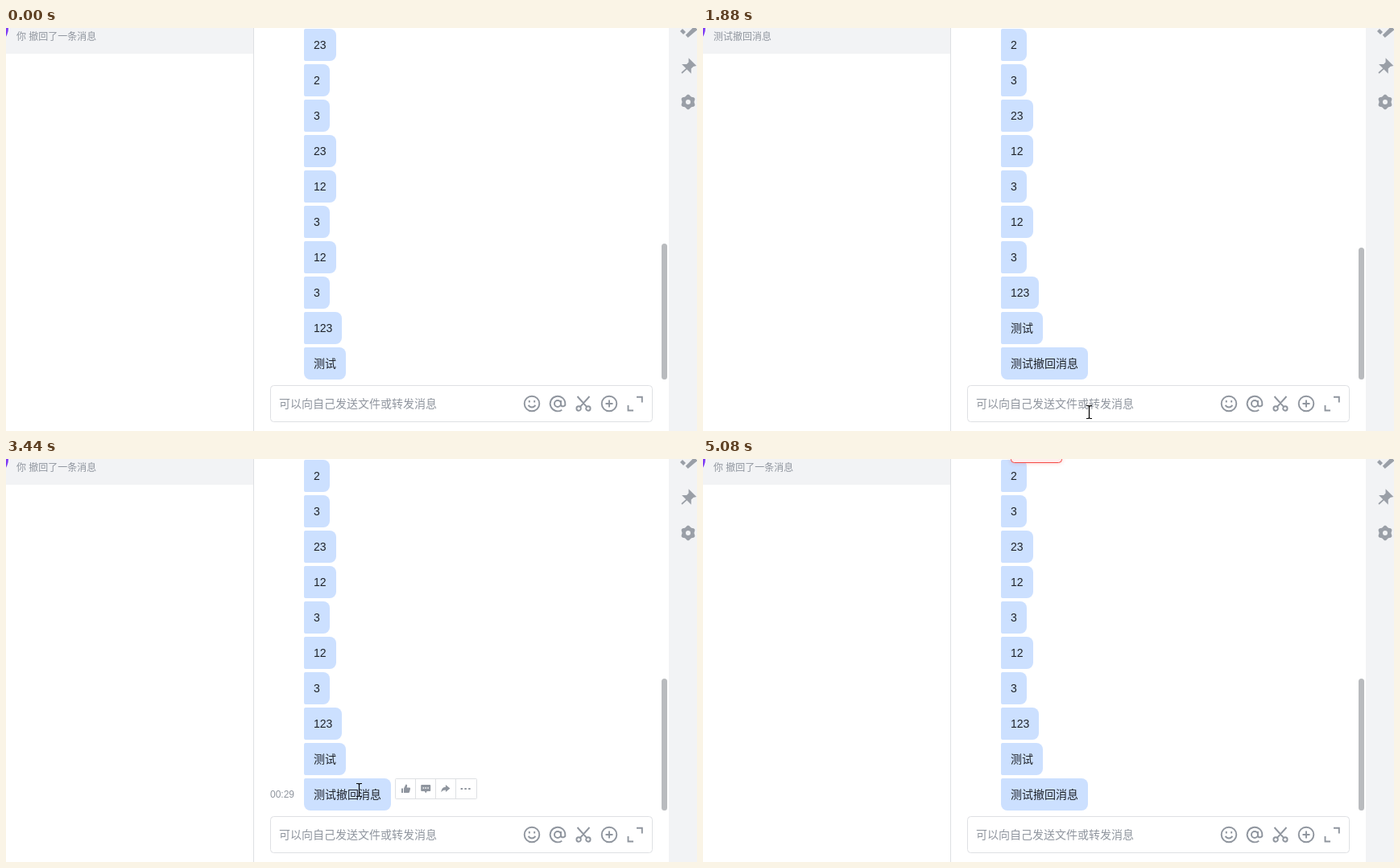
An HTML page with a canvas that plays this animation: 858x501 px, repeating every 5250 ms.

```html
<!DOCTYPE html>
<html lang="zh-CN">
<head>
<meta charset="utf-8">
<style>
html, body { margin: 0; height: 100%; overflow: hidden; background: #fff; }
canvas { display: block; }
</style>
</head>
<body>
<canvas id="stage" width="858" height="501"></canvas>
<script>
const LOOP = 5250;
const SENT = 1660, RECALLED = 3040, TOAST = 4640;
const MENU_TIMES = [[2380, 2960], [3740, 4360]];
const INK = '#1f2329', GREY = '#8f959e', DARK = '#646a73', LINE = '#dee0e3', PANEL = '#f2f3f5';
const FONT = '"Liberation Sans", "Noto Sans CJK SC", "Noto Sans CJK", sans-serif';
const IME_FONT = '"Noto Sans", "Noto Sans CJK SC", "Noto Sans CJK", sans-serif';
const MESSAGES = ['23', '2', '3', '23', '12', '3', '12', '3', '123', '测试', '测试撤回消息'];

const FIRST_WORD = ['c', 'ce', "ce's", "ce'sh", "ce'shi"];
const SECOND_WORD = ['c', 'ch', 'che', "che'h", "che'hu", "che'hui", "che'hui'x", "che'hui'xi",
  "che'hui'xia", "che'hui'xiao", "che'hui'xiao'x", "che'hui'xiao'xi"];
// The longest matching prefix supplies the suggestions.
const CANDIDATES = [
  ["che'hui'x", '撤回消息 撤回 扯会 车 撤 扯 彻'],
  ["che'h", '撤回 扯会 车 撤 扯 彻 澈'],
  ['che', '车 撤 扯 彻 澈 掣 坼'],
  ['ch', '出 吃 车 长 成 场 处'],
  ["ce's", '测试 侧室 测 侧 策 册 厕'],
  ['ce', '测 侧 策 册 厕 恻 岑'],
  ['c', '才 从 次 此 出 草 测'],
];

// Pointer path: time, x, y.
const PATH = [
  [80, 431, 473], [1640, 431, 473], [1880, 479, 477], [2060, 486, 440], [2300, 571, 411],
  [2480, 600, 385], [2640, 634, 370], [2840, 646, 366], [2960, 646, 366], [3140, 540, 400],
  [3290, 310, 400], [3360, 360, 376], [3440, 437, 411], [3640, 568, 411], [3740, 573, 411],
  [4000, 613, 393], [4200, 622, 367], [4360, 622, 367], [4600, 500, 420], [4740, 474, 446],
  [4880, 518, 468], [5070, 505, 515],
];

const ICON = {
  star: 'M0-6l1.8 3.9 4.2.5-3.1 2.9.8 4.2L0 3.5l-3.7 2 .8-4.2L-6-1.6l4.2-.5z',
  pin: 'M1-6l5 5-2 .5-2 2v3l-6-6h3l2-2zM-1 1.5l-4.5 4',
  task: 'M-6 0l2-1.5 2.5 2L4-5l2 1.5-7.5 8z',
  undo: 'M-2.5-5l-3 3 3 3M-5.5-2h7a3.5 3.5 0 0 1 0 7h-4',
  translate: 'M-5.2-2.5a5.7 5.7 0 0 1 10.8 2M5.2 2.5A5.7 5.7 0 0 1-5.6 .5M-2 2.5L0-2.5l2 5M-1.3 1h2.6',
  select: 'M0-4h6M0 0h6M0 4h6M-6-4l1 1 2-2M-6 0l1 1 2-2M-6 4l1 1 2-2',
  trash: 'M-6-4h12M-2-6h4M-4.5-4v9.5h9v-9.5M-1.5-1v4M1.5-1v4',
  dots: 'M-6-1h2.4v2h-2.4zM-1.2-1h2.4v2h-2.4zM3.6-1h2.4v2h-2.4z',
  thumb: 'M-5.5-.5h2V5h-2zM-2.5-.5L0-5.5c1.8 0 2 1.5 1.2 4h3.3c1 0 1.2.8 1 1.6l-1 4c-.2.6-.6.9-1.2.9h-5.8z',
  comment: 'M-5-5H5q1 0 1 1v6q0 1-1 1H1.5L0 5.5-1.5 3H-5q-1 0-1-1v-6q0-1 1-1zM-3.6-1.8v1.6h1.6v-1.6zM-.8-1.8v1.6h1.6v-1.6zM2-1.8v1.6h1.6v-1.6z',
  share: 'M0-5l5.5 4.5L0 4V1.4c-2.5 0-4 .6-5.5 2.8.2-4 2-6.3 5.5-6.5z',
  smile: 'M9.3 0a9.3 9.3 0 1 0-18.6 0a9.3 9.3 0 1 0 18.6 0M-4.5 2q4.5 5 9 0M-3.2-4v2.4M3.2-4v2.4',
  at: 'M4 0a4 4 0 1 0-8 0a4 4 0 1 0 8 0M4-4v5.2a2.7 2.7 0 0 0 5.3-1.2a9.3 9.3 0 1 0-4 7.7',
  scissors: 'M-7.5-9L4.2 4.2M7.5-9L-4.2 4.2M-3.2 6a2.7 2.7 0 1 0-5.4 0a2.7 2.7 0 1 0 5.4 0M8.6 6a2.7 2.7 0 1 0-5.4 0a2.7 2.7 0 1 0 5.4 0',
  plus: 'M9.3 0a9.3 9.3 0 1 0-18.6 0a9.3 9.3 0 1 0 18.6 0M-4.5 0h9M0-4.5v9',
  expand: 'M-8.5 2v6.5H-2M2-8.3h6.8v6.8',
  pen: 'M-10 0l3-3 4 4-3 3zM-3.2 4.8L7.5-6l4 4L-.2 8z',
  hand: 'M0 0c-1 0-1.5.7-1.5 1.6v8.2L-3 8.4c-1.2-1-3 .2-2 1.6l4 6v1.8h8.6V16l1.5-3.6V7c0-1.6-2-1.7-2.3-.4 0-1.7-2.4-2-2.7-.5-.1-1.5-2.4-1.6-2.7-.2V1.5C1.4.6 1 0 0 0zM1.5 6v4M4.1 6.5V10M6.8 7v3',
  arrow: 'M0 0v15l3.5-3.3 2.4 5.3 2.2-1-2.4-5.2h4.8z',
  beam: 'M-3.5-8h2.5l1 1 1-1h2.5M0-7V7M-3.5 8h2.5l1-1 1 1h2.5',
};
const MENU = [['star', '收藏'], ['pin', 'Pin'], ['task', '任务'], ['undo', '撤回'],
  ['translate', '翻译'], ['select', '多选'], ['trash', '删除'], ['dots', '更多']];

const ctx = document.getElementById('stage').getContext('2d');

function text(s, x, y, size = 14, color = INK, font = FONT) {
  ctx.font = `${size}px ${font}`;
  ctx.fillStyle = color;
  ctx.fillText(s, x, y);
}

function rect(x, y, w, h, fill, radius = 0, stroke) {
  ctx.beginPath();
  ctx.roundRect(x, y, w, h, radius);
  if (fill) { ctx.fillStyle = fill; ctx.fill(); }
  if (stroke) { ctx.strokeStyle = stroke; ctx.lineWidth = 1; ctx.stroke(); }
}

function withShadow(color, blur, paint) {
  ctx.save();
  ctx.shadowColor = color;
  ctx.shadowBlur = blur;
  paint();
  ctx.restore();
}

function icon(name, x, y, { fill, stroke, width = 1.2, scale = 1 }) {
  const path = new Path2D(ICON[name]);
  ctx.save();
  ctx.translate(x, y);
  ctx.scale(scale, scale);
  ctx.lineWidth = width;
  if (fill) { ctx.fillStyle = fill; ctx.fill(path, 'evenodd'); }
  if (stroke) { ctx.strokeStyle = stroke; ctx.stroke(path); }
  ctx.restore();
}

function gear(x, y, color) {
  ctx.beginPath();
  for (let i = 0; i < 72; i++) {
    const a = i * Math.PI / 36, r = 8.4 + 0.9 * Math.cos(6 * a);
    ctx.lineTo(x + r * Math.sin(a), y - r * Math.cos(a));
  }
  ctx.closePath();
  ctx.moveTo(x + 3, y);
  ctx.arc(x, y, 3, 0, 7);
  ctx.fillStyle = color;
  ctx.fill('evenodd');
}

function pointerAt(t) {
  if (t < PATH[0][0]) return null;
  const i = PATH.findIndex(p => p[0] > t);
  if (i < 0) return null;
  const [t0, x0, y0] = PATH[i - 1], [t1, x1, y1] = PATH[i];
  const k = (t - t0) / (t1 - t0);
  return { x: x0 + (x1 - x0) * k, y: y0 + (y1 - y0) * k };
}

function draftAt(t) {
  if (t < 80 || t >= SENT) return { done: '', pre: '' };
  if (t < 660) return { done: '', pre: FIRST_WORD[Math.min(4, Math.floor((t - 80) / 90))] };
  if (t < 900) return { done: '测试', pre: '' };
  if (t >= 1520) return { done: '测试撤回消息', pre: '' };
  const key = t < 1120 ? Math.min(5, (t - 900) / 28) : Math.min(11, 6 + (t - 1120) / 44);
  return { done: '测试', pre: SECOND_WORD[Math.floor(key)] };
}

function drawFrame(t) {
  rect(0, 0, 307, 32, PANEL);
  rect(307, 0, 1, 501, LINE);
  ctx.beginPath();
  ctx.arc(-17, 0, 20, 0, 7);
  ctx.fillStyle = '#7f3bf5';
  ctx.fill();
  const unsent = t < SENT || t >= RECALLED;
  text(unsent ? '你 撤回了一条消息' : '测试撤回消息', 13, 15, 12, GREY);

  rect(823, 0, 35, 501, PANEL);
  const sideGrey = '#9a9fa7';
  icon('pen', 847, 4, { fill: sideGrey });
  icon('pin', 847, 48, { fill: sideGrey, stroke: sideGrey, scale: 1.45 });
  gear(847, 92, sideGrey);
  const top = t < SENT ? 268 : 273;
  rect(814, top, 7, 437 - top, '#b9bbbe', 3.5);
}

function drawMessages(t) {
  const first = t < SENT ? 0 : 1;
  return MESSAGES.slice(first, first + 10).map((message, i) => {
    const y = 1 + 44 * i;
    ctx.font = `14px ${FONT}`;
    const w = Math.round(ctx.measureText(message).width) + 24;
    rect(370, y, w, 40, '#cce0ff', [2, 8, 8, i === 9 ? 8 : 2]);
    text(message, 382, y + 25);
    return { y, right: 370 + w };
  });
}

function drawInput(draft) {
  rect(328.5, 444.5, 474, 45, '#fff', 4, LINE);
  const { done, pre } = draft;
  if (done || pre) {
    text(done + pre, 339, 472);
    const start = 339 + ctx.measureText(done).width;
    const end = 339 + ctx.measureText(done + pre).width;
    rect(Math.round(end) - 1, 460, 1, 15, '#000');
    for (let x = start; pre && x < end; x += 2) rect(x, 474, 1, 1, INK);
  } else {
    text('可以向自己发送文件或转发消息', 339, 472, 14, GREY);
  }
  ['smile', 'at', 'scissors', 'plus', 'expand'].forEach((name, i) =>
    icon(name, 653 + 32 * i, 467, { stroke: GREY, width: 1.9 }));
}

function drawToolbar(row, menuOpen) {
  const x = row.right + 5.5, y = row.y + 0.5;
  rect(x, y, 101, 25, '#fff', 1, LINE);
  for (let i = 1; i < 4; i++) rect(x + 25 * i - 0.5, y, 1, 25, LINE);
  ['thumb', 'comment', 'share', 'dots'].forEach((name, i) =>
    icon(name, x + 13 + 24.7 * i, y + 12.5, { fill: menuOpen && i === 3 ? '#3370ff' : GREY }));
  if (!menuOpen) text('00:29', 328, row.y + 24, 12, GREY);
}

function drawMenu(pointer) {
  withShadow('rgba(31,35,41,.12)', 6, () => rect(588.5, 258.5, 85, 239, '#fff', 4, LINE));
  MENU.forEach(([name, label], i) => {
    const y = 280 + 28 * i + (i === 7 ? 1 : 0);
    if (pointer.x > 588 && Math.abs(pointer.y - y) < 14) rect(589, y - 14, 84, 28, '#eff0f1');
    if (name === 'dots') {
      rect(589, 462, 84, 1, LINE);
      rect(600, y - 7, 14, 14, LINE, 2);
      icon(name, 607, y, { fill: DARK, scale: 0.8 });
    } else {
      icon(name, 607, y, { stroke: DARK });
    }
    text(label, 620, y + 4.5, 12);
  });
}

function drawCandidates(draft) {
  ctx.font = `14px ${FONT}`;
  let x = 340 + Math.floor(ctx.measureText(draft.done).width);
  const words = CANDIDATES.find(([key]) => draft.pre.startsWith(key))[1].split(' ');
  withShadow('rgba(0,0,0,.35)', 4, () => rect(x, 476, 600, 40, '#f5f5f5'));
  words.forEach((word, i) => {
    const w = 43 + 18 * word.length;
    if (i === 0) rect(x, 476, w, 25, '#9aabb5');
    text(i + 1, x + 13, 502, 18, i ? '#777' : '#444', IME_FONT);
    text(word, x + 31, 503, 18, '#000', IME_FONT);
    x += w;
  });
  rect(x + 1, 476, 1, 25, '#ddd');
  text('‹', x + 12, 503, 22, '#999', IME_FONT);
  text('›', x + 46, 503, 22, '#999', IME_FONT);
}

function drawToast(t) {
  const bottom = 5.5 * Math.min(1, (t - TOAST) / 120) - 1;
  withShadow('rgba(245,74,69,.25)', 5, () =>
    rect(382.5, bottom - 40, 63, 40, '#fff3f2', 4, '#f54a45'));
}

function drawPointer({ x, y }, row, menuOpen) {
  const overInput = y > 444 && y < 490 && x < 803;
  const overBubble = row && x > 370 && x < row.right;
  const overButton = row && x > row.right + 5 && x < row.right + 107 && y < row.y + 26;
  if (menuOpen && x > 588 || overButton) {
    icon('hand', x, y, { fill: '#fff', stroke: '#000', width: 1.1 });
  } else if (overInput || overBubble) {
    icon('beam', Math.round(x) + 0.5, Math.round(y) + 0.5, { stroke: '#000' });
  } else {
    icon('arrow', x, y, { fill: '#fff', stroke: '#000', width: 1 });
  }
}

function draw(t) {
  rect(0, 0, 858, 501, '#fff');
  drawFrame(t);
  const rows = drawMessages(t);
  const draft = draftAt(t);
  const pointer = pointerAt(t);
  const menuOpen = MENU_TIMES.some(([from, to]) => t >= from && t < to);
  const row = menuOpen ? rows[9]
    : pointer && rows.find(r => Math.abs(pointer.y - r.y - 20) <= 22);
  drawInput(draft);
  if (row) drawToolbar(row, menuOpen);
  if (menuOpen) drawMenu(pointer);
  if (draft.pre) drawCandidates(draft);
  if (t >= TOAST) drawToast(t);
  if (pointer) drawPointer(pointer, row, menuOpen);
}

const start = performance.now();
function tick() {
  draw((performance.now() - start) % LOOP);
  requestAnimationFrame(tick);
}
tick();
</script>
</body>
</html>
```
